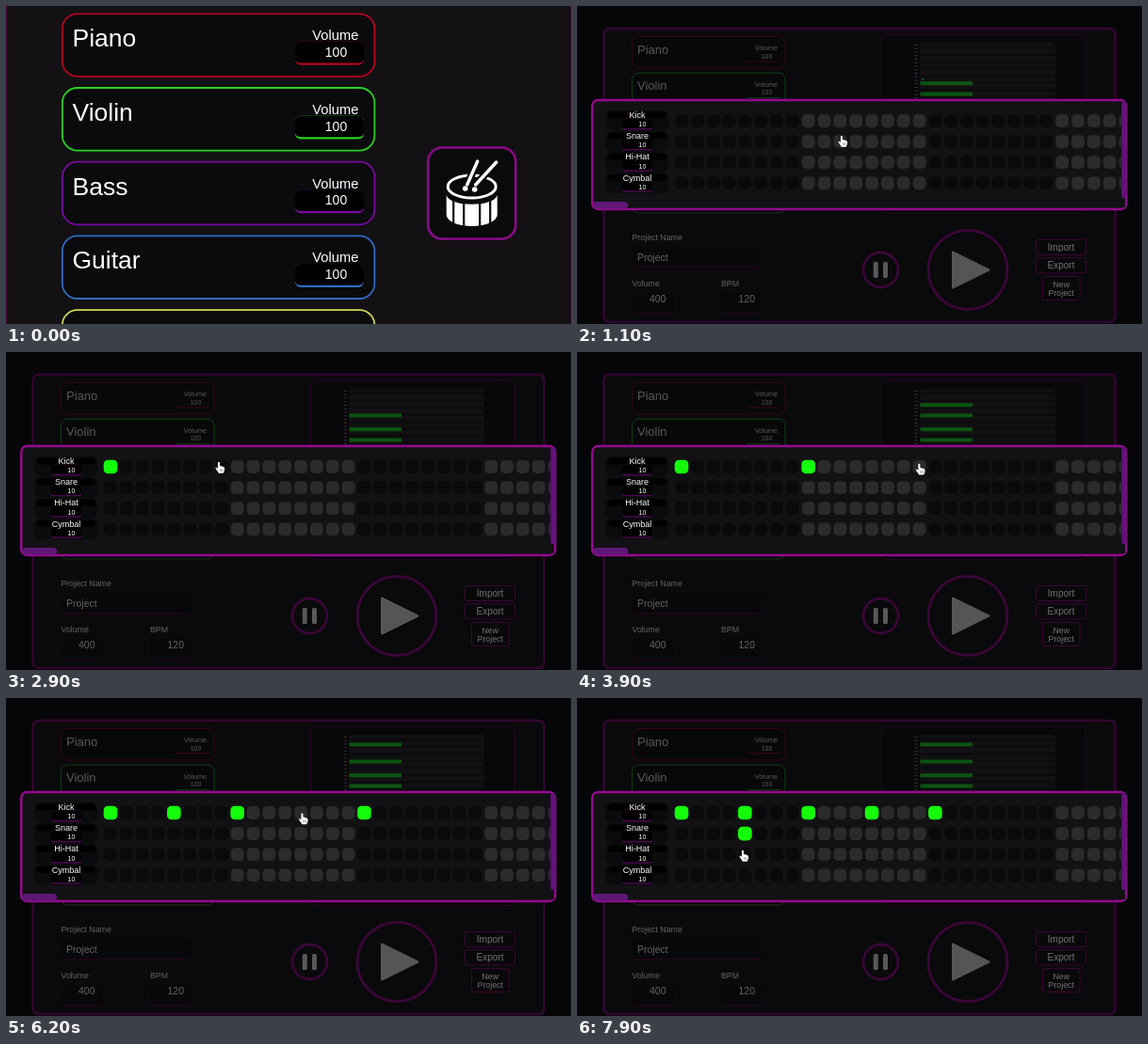
Write an HTML page with a canvas that moves like this. It is 600 px wide and 338 px high and loops after 8000 ms.

```html
<!DOCTYPE html>
<html lang="en">
<head>
<meta charset="utf-8">
<title>Drum sequencer</title>
<style>
html, body { margin: 0; width: 100%; height: 100%; overflow: hidden; background: #0a080b; }
canvas { display: block; }
</style>
</head>
<body>
<canvas id="stage" width="600" height="338"></canvas>
<script>
const ctx = document.getElementById('stage').getContext('2d');
const FONT = '"Liberation Sans", Arial, sans-serif';
const LOOP = 8000, OPEN_AT = 1050;

function box(x, y, w, h, r, fill, stroke, line = 1) {
  ctx.beginPath();
  ctx.roundRect(x, y, w, h, r);
  if (fill) { ctx.fillStyle = fill; ctx.fill(); }
  if (stroke) { ctx.strokeStyle = stroke; ctx.lineWidth = line; ctx.stroke(); }
}

function text(str, x, y, size, color, align = 'left') {
  ctx.font = `${size}px ${FONT}`;
  ctx.textAlign = align;
  ctx.fillStyle = color;
  ctx.fillText(str, x, y);
}

function ring(x, y, r, color, line) {
  ctx.beginPath();
  ctx.arc(x, y, r, 0, Math.PI * 2);
  ctx.strokeStyle = color;
  ctx.lineWidth = line;
  ctx.stroke();
}

const ease = u => u * u * (3 - 2 * u);

// Interpolates rows of [time, ...values].
function track(keys, t) {
  if (t <= keys[0][0]) return keys[0].slice(1);
  for (let i = 1; i < keys.length; i++) {
    const a = keys[i - 1], b = keys[i];
    if (t < b[0]) {
      const u = ease((t - a[0]) / (b[0] - a[0]));
      return a.slice(1).map((v, k) => v + (b[k + 1] - v) * u);
    }
  }
  return keys[keys.length - 1].slice(1);
}

const HAND = new Path2D('M-2 2C-2-.7 2-.7 2 2V8.5C3 7.4 5.2 7.6 5.6 9.2C7 8.2 8.8 8.8 9 10.4' +
  'C10.4 9.8 11.6 10.8 11.6 12.4V16C11.6 19 9.6 20 9.4 22.5H-.6C-1.4 19.6-4.4 17-6.4 13.4' +
  'C-7.4 11.4-5 10.2-3.6 11.8L-2 13.6Z');
const ARROW = new Path2D('M0 0V18L4 14L7 21L10 20L7 13H13Z');

function cursor(shape, x, y, scale) {
  ctx.save();
  ctx.translate(x, y);
  ctx.scale(scale, scale);
  ctx.lineWidth = 1.6;
  ctx.strokeStyle = '#111';
  ctx.stroke(shape);
  ctx.fillStyle = '#fff';
  ctx.fill(shape);
  if (shape === HAND) {
    ctx.lineWidth = 1;
    ctx.strokeStyle = '#555';
    ctx.stroke(new Path2D('M2.2 14V19M5 14V19M7.8 14V19'));
  }
  ctx.restore();
}

// Zoomed instrument list
const CARDS = [
  ['Piano', '#b3041f'], ['Violin', '#25d31f'], ['Bass', '#7808a0'],
  ['Guitar', '#2f6cc0'], ['', '#cbd656']
];
const ENTER = [[100, 596, 332], [650, 513, 224]];

function drumIcon(scale) {
  ctx.save();
  ctx.translate(494.7, 199);
  ctx.scale(scale, scale);
  box(-46.5, -48.5, 93, 97, 15, '#0a090b', '#8b0a88', 2.6);

  ctx.fillStyle = '#fff';
  ctx.fill(new Path2D('M-27 2C-24 15 24 15 27 2V23C25 39-25 39-27 23Z'));
  ctx.strokeStyle = '#0a090b';
  ctx.lineWidth = 2.2;
  ctx.stroke(new Path2D('M-19.5 8V36M-8.5 10V39M8.5 10V39M19.5 8V36'));

  ctx.beginPath();
  ctx.ellipse(0, -7, 25.5, 12, 0, 0, Math.PI * 2);
  ctx.fillStyle = '#0a090b';
  ctx.fill();
  ctx.strokeStyle = '#fff';
  ctx.lineWidth = 3;
  ctx.stroke();

  ctx.lineCap = 'round';
  const sticks = new Path2D('M-5-9L6-34M4-9L26-33');
  ctx.strokeStyle = '#0a090b';
  ctx.lineWidth = 8;
  ctx.stroke(sticks);
  ctx.strokeStyle = '#fff';
  ctx.lineWidth = 3.4;
  ctx.stroke(sticks);
  ctx.fillStyle = '#fff';
  for (const [x, y] of [[-7, -5], [3, -4]]) {
    ctx.beginPath();
    ctx.arc(x, y, 2.8, 0, Math.PI * 2);
    ctx.fill();
  }
  ctx.restore();
}

function drawList(t) {
  ctx.fillStyle = '#131114';
  ctx.fillRect(0, 0, 600, 338);
  ctx.fillStyle = '#3d0339';
  ctx.fillRect(0, 0, 1.5, 338);
  ctx.fillStyle = '#24061f';
  ctx.fillRect(599, 0, 1, 338);

  CARDS.forEach(([name, color], i) => {
    const y = 8.3 + i * 78.7;
    box(59.8, y, 331.6, 66.6, 16, '#0b0a0c', color, 1.8);
    if (!name) return;
    text(name, 70.5, y + 34.8, 26.5, '#fff');
    text('Volume', 349.8, y + 28, 14.7, '#fff', 'center');
    box(307, y + 29.5, 73, 25, 6, color);
    box(307, y + 29.5, 73, 22.8, [6, 6, 5, 5], '#000');
    text('100', 350.5, y + 45.7, 14, '#fff', 'center');
  });

  const grow = ease(Math.min(1, Math.max(0, (t - 450) / 300)));
  drumIcon(1 + 0.055 * grow);
  if (t >= 100) {
    const [x, y] = track(ENTER, t);
    const over = x < 542 && y < 250;
    cursor(over ? HAND : ARROW, x, y, 1);
  }
}

// Dimmed project page
function field(label, value, x, y, w, valueX) {
  text(label, x, y, 8.8, '#646266');
  box(x, y + 7.5, w, 21, 3, '#080709');
  ctx.fillStyle = '#21071f';
  ctx.fillRect(x + 1, y + 28, w - 2, 1);
  text(value, valueX, y + 19.5 + (w > 100 ? 2 : -3), 10.5, '#646266');
}

function smallCard(name, y, color) {
  box(58.5, y, 162.5, 33.5, 7, '#080709', color, 1);
  if (!name) return;
  text(name, 64, y + 18, 13, '#59575b');
  text('Volume', 201, y + 14.5, 7.3, '#59575b', 'center');
  text('100', 201.5, y + 23, 7, '#59575b', 'center');
  ctx.fillStyle = color;
  ctx.fillRect(180, y + 26, 36, 1);
}

function drawRoll(t) {
  box(323.5, 30.5, 216.5, 190, 6, '#080709', '#270725', 1);
  box(364, 39, 144, 90, 3, '#111012');
  ctx.fillStyle = '#0c0b0d';
  for (let y = 43; y < 99; y += 7.5) ctx.fillRect(364, y, 144, 2.5);
  ctx.fillStyle = '#302f32';
  for (let y = 41; y < 99; y += 3.75) ctx.fillRect(358.5, y, 3.5, 1);

  const bars = [82.2, 93.6];
  if (t >= 1600) bars.push(67.5);
  else { ctx.fillStyle = '#0c5410'; ctx.fillRect(366, 77, 2, 2); }
  if (t >= 3700) bars.push(track([[3700, 57], [4500, 52.6], [5050, 52.6], [5400, 49.4]], t)[0]);
  ctx.fillStyle = '#0b5510';
  for (const y of bars) ctx.fillRect(364.5, y - 2, 55.5, 4);
}

function button(x, y, w, h, lines) {
  box(x, y, w, h, 2, '#09080a', '#3b0734', 1);
  lines.forEach((s, i) => text(s, x + w / 2, y + 11.4 + i * 9.5, lines.length > 1 ? 8.8 : 10, '#737175', 'center'));
}

function drawPage(t) {
  ctx.fillStyle = '#060508';
  ctx.fillRect(0, 0, 600, 338);
  box(28.5, 24, 543, 312, 6, '#0a090b', '#310630', 2.6);
  smallCard('Piano', 32.5, '#36080f');
  smallCard('Violin', 71.2, '#0c4312');
  smallCard('', 186.5, '#20351c');
  drawRoll(t);

  field('Project Name', 'Project', 58.5, 249, 138, 64);
  field('Volume', '400', 58.5, 298, 44, 77);
  field('BPM', '120', 153, 298, 44, 171.5);

  ring(322.5, 280.5, 18.5, '#390737', 2.8);
  box(314.8, 272, 5, 17, 1.5, '#59575a');
  box(325, 272, 5, 17, 1.5, '#59575a');
  ring(415, 280.5, 42, '#390737', 3);
  ctx.fillStyle = ctx.strokeStyle = '#565457';
  ctx.lineWidth = 2;
  ctx.lineJoin = 'round';
  const play = new Path2D('M399 261.5V299.5L437.5 280.5Z');
  ctx.fill(play);
  ctx.stroke(play);

  button(487.5, 248.5, 53, 16, ['Import']);
  button(487.5, 267.8, 53, 16, ['Export']);
  button(494.5, 287.5, 39.5, 25, ['New', 'Project']);
}

// Step grid: [row, column, time switched on]
const HITS = [[0, 0, 2400], [0, 8, 3500], [0, 16, 4200], [0, 4, 5200], [0, 12, 6400], [1, 4, 7500]];
const PATH = [
  [1450, 281, 138], [2200, 111, 119], [2600, 111, 119],
  [2900, 226, 117], [3250, 246, 118], [3550, 246, 118],
  [4000, 380, 119], [4250, 380, 119], [4950, 178.5, 117], [5250, 178.5, 117],
  [5900, 314.5, 122.5], [6500, 314.5, 122.5], [7250, 178, 140],
  [7650, 178, 140], [7880, 176, 162]
];

function drawGrid(t) {
  box(16.2, 100, 567, 116, 6, '#121114', '#960a90', 2.4);

  ctx.save();
  ctx.beginPath();
  ctx.rect(17, 101, 561.5, 107);
  ctx.clip();
  ['Kick', 'Snare', 'Hi-Hat', 'Cymbal'].forEach((name, row) => {
    const cy = 122 + row * 22.1;
    box(30, cy - 11, 67.5, 21.5, 7, '#0b0a0c');
    box(33, cy - 9.5, 62, 7, 3.5, '#000');
    box(48, cy - 2.5, 32, 11.7, 2.5, '#69086c');
    box(48, cy - 2.5, 32, 10.7, 2.5, '#000');
    text(name, 64, cy - 2.8, 9, '#fff', 'center');
    text('10', 69.5, cy + 6.3, 7, '#fff', 'center');
    for (let col = 0; col < 29; col++) {
      const on = HITS.some(([r, c, at]) => r === row && c === col && t >= at);
      const color = on ? '#14fb0b' : col & 8 ? '#2b2a2d' : '#0a090b';
      const half = on ? 7.3 : 6.9;
      box(111 + col * 16.84 - half, cy - half, half * 2, half * 2, 4.6, color);
    }
  });
  ctx.restore();

  box(17, 208, 37, 7.5, 3.5, '#5f1777');
  box(578.3, 101, 5.2, 103, 2.5, '#621279');
  ctx.fillStyle = '#121114';
  ctx.fillRect(578.5, 206, 3.5, 8);
}

function draw() {
  const t = performance.now() % LOOP;
  if (t < OPEN_AT) {
    drawList(t);
  } else {
    drawPage(t);
    drawGrid(t);
    cursor(HAND, ...track(PATH, t), 0.52);
  }
  requestAnimationFrame(draw);
}
draw();
</script>
</body>
</html>
```
